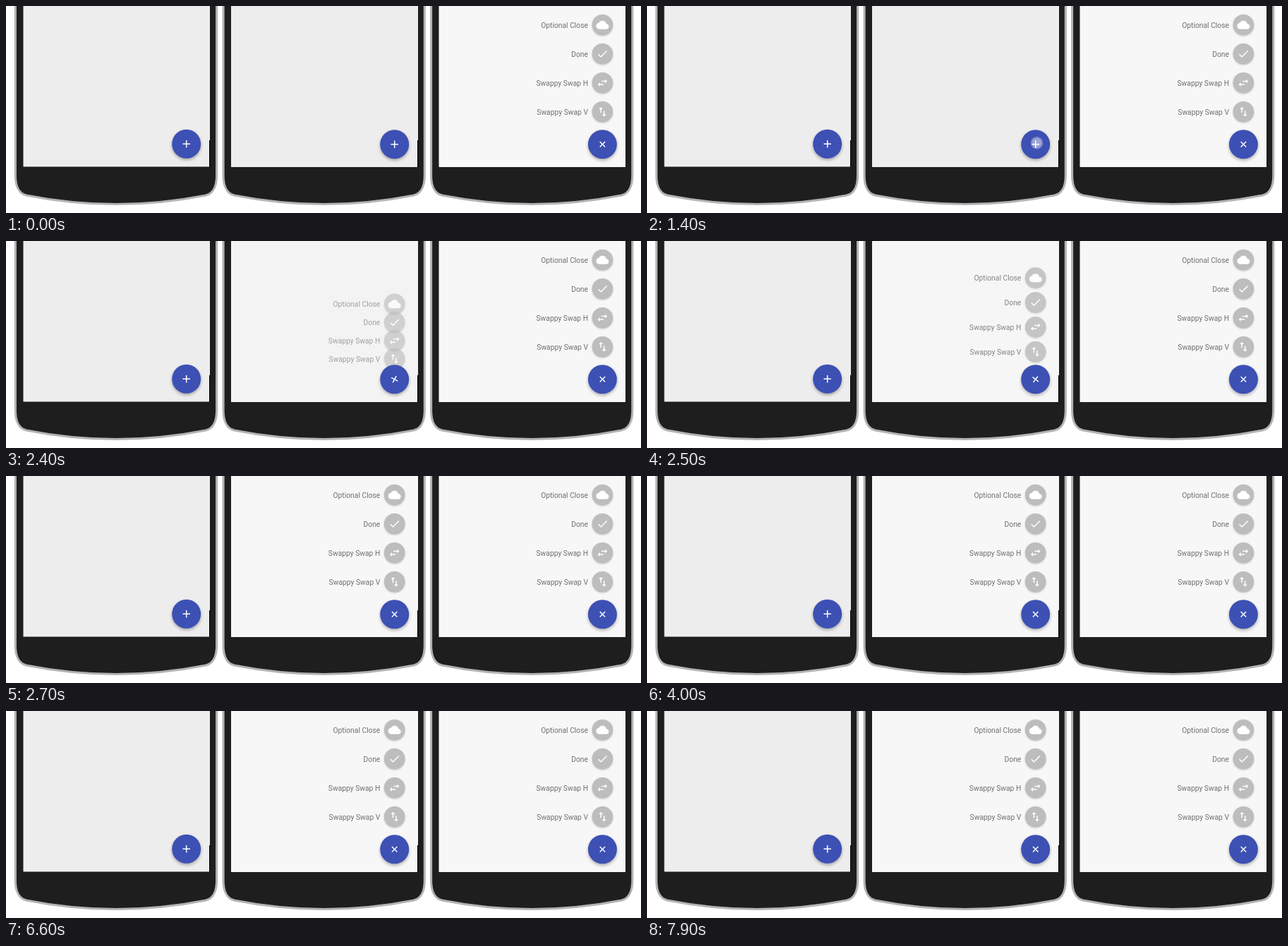
An HTML page with a canvas for the animation above (8000 ms loop, 900x293 px).

```html
<!DOCTYPE html>
<html lang="en">
<head>
<meta charset="utf-8">
<title>Floating action menu</title>
<style>
  html, body { margin: 0; width: 100%; height: 100%; overflow: hidden; background: #fff; }
  canvas { display: block; width: 900px; height: 293px; }
</style>
</head>
<body>
<canvas id="stage" width="900" height="293"></canvas>
<script>
const WIDTH = 900, HEIGHT = 293;
const LOOP = 8000;
const ICON_SCALE = 0.75;
const FAB_RADIUS = 20.5;
const SEAM_TOP = 190;

const stage = document.getElementById('stage').getContext('2d');
const layerCanvas = document.createElement('canvas');
layerCanvas.width = WIDTH;
layerCanvas.height = HEIGHT;
const layer = layerCanvas.getContext('2d');

const PHONES = [
  { x: 12, screen: [24.5, 288], bottom: 227.5, fab: [255.7, 195.3], seam: true },
  { x: 306.7, screen: [319, 583], bottom: 228, fab: [550.7, 195.8], seam: true },
  { x: 601.2, screen: [613.5, 878], bottom: 228, fab: [845.4, 195.8], seam: false }
];

const ITEMS = [
  ['Optional Close', 'M19.35 10.04C18.67 6.59 15.64 4 12 4 9.11 4 6.6 5.64 5.35 8.04 2.34 8.36 0 10.91 0 14c0 3.31 2.69 6 6 6h13c2.76 0 5-2.24 5-5 0-2.64-2.05-4.78-4.65-4.96z'],
  ['Done', 'M9 16.17L4.83 12l-1.42 1.41L9 19 21 7l-1.41-1.41z'],
  ['Swappy Swap H', 'M6.99 11L3 15l3.99 4v-3H14v-2H6.99v-3zM21 9l-3.99-4v3H10v2h7.01v3L21 9z'],
  ['Swappy Swap V', 'M16 17.01V10h-2v7.01h-3L15 21l4-3.99h-3zM9 3L5 6.99h3V14h2V6.99h3L9 3z']
].map(([label, path], i) => ({ label, icon: new Path2D(path), y: 26.8 + 41 * i }));
const PLUS = new Path2D('M19 13h-6v6h-2v-6H5v-2h6V5h2v6h6z');

// Start time and openness; each pose holds until the next one.
const OPENING = [[0, 0], [1700, 0.04], [1900, 0.13], [2100, 0.33], [2200, 0.5],
  [2400, 0.63], [2500, 0.85], [2600, 0.97], [2700, 1]];
const TOUCH = { from: 1400, to: 1700 };

const openness = t => OPENING.filter(([start]) => start <= t).pop()[1];

function disc(ctx, x, y, r, color) {
  ctx.fillStyle = color;
  ctx.beginPath();
  ctx.arc(x, y, r, 0, Math.PI * 2);
  ctx.fill();
}

function raisedDisc(ctx, x, y, r, color, shadow, blur, dy) {
  ctx.save();
  ctx.shadowColor = shadow;
  ctx.shadowBlur = blur;
  ctx.shadowOffsetY = dy;
  disc(ctx, x, y, r, color);
  ctx.restore();
}

function drawIcon(ctx, icon, x, y, angle = 0) {
  ctx.save();
  ctx.translate(x, y);
  ctx.rotate(angle);
  ctx.scale(ICON_SCALE, ICON_SCALE);
  ctx.translate(-12, -12);
  ctx.fillStyle = '#fff';
  ctx.fill(icon);
  ctx.restore();
}

function drawBody({ x, screen: [left, right], bottom, seam }, open) {
  stage.save();
  stage.translate(x, 0);
  stage.beginPath();
  stage.moveTo(1.4, -10);
  stage.lineTo(1.4, 240);
  stage.bezierCurveTo(1.4, 254, 6, 265.5, 17, 268);
  stage.quadraticCurveTo(144, 293, 271, 268);
  stage.bezierCurveTo(282, 265.5, 286.6, 254, 286.6, 240);
  stage.lineTo(286.6, -10);
  stage.fillStyle = '#1e1e1e';
  stage.fill();
  stage.lineWidth = 3.1;
  stage.strokeStyle = '#b3b3b3';
  stage.stroke();
  stage.restore();

  const level = Math.round(237 + 10 * open);
  stage.fillStyle = `rgb(${level},${level},${level})`;
  stage.fillRect(left, 0, right - left, bottom);
  if (seam) {
    stage.fillRect(right, 0, 1, SEAM_TOP);
    stage.fillStyle = '#000';
    stage.fillRect(right, SEAM_TOP, 1, bottom - SEAM_TOP);
  }
}

// Each item is composed on its own layer so that it fades as one piece.
function drawItem({ label, icon, y }, [x, fabY], open) {
  const cy = fabY + (y - fabY) * open;
  layer.clearRect(0, 0, WIDTH, HEIGHT);
  raisedDisc(layer, x, cy, 14.8, '#bdbdbd', 'rgba(0,0,0,0.2)', 2.5, 1);
  drawIcon(layer, icon, x, cy);
  layer.font = '10.3px Roboto, sans-serif';
  layer.textAlign = 'right';
  layer.fillStyle = '#707070';
  layer.fillText(label, x - 20.4, cy + 3.9);
  stage.globalAlpha = open;
  stage.drawImage(layerCanvas, 0, 0);
  stage.globalAlpha = 1;
}

function drawPhone(phone, open) {
  const [x, y] = phone.fab;
  drawBody(phone, open);
  if (open > 0) ITEMS.forEach(item => drawItem(item, phone.fab, open));
  raisedDisc(stage, x, y, FAB_RADIUS, '#3d50b4', 'rgba(0,0,0,0.3)', 4.5, 2.3);
  drawIcon(stage, PLUS, x, y, open * Math.PI / 4);
}

function drawTouch([x, y]) {
  disc(stage, x + 1.8, y - 2, 8.8, 'rgba(255,255,255,0.33)');
  disc(stage, x + 1.8, y - 2, 6.8, 'rgba(255,255,255,0.25)');
}

function draw(t) {
  stage.fillStyle = '#fff';
  stage.fillRect(0, 0, WIDTH, HEIGHT);
  const states = [0, openness(t), 1];
  PHONES.forEach((phone, i) => drawPhone(phone, states[i]));
  if (t >= TOUCH.from && t < TOUCH.to) drawTouch(PHONES[1].fab);
}

function tick() {
  draw(performance.now() % LOOP);
  requestAnimationFrame(tick);
}
tick();
</script>
</body>
</html>
```
